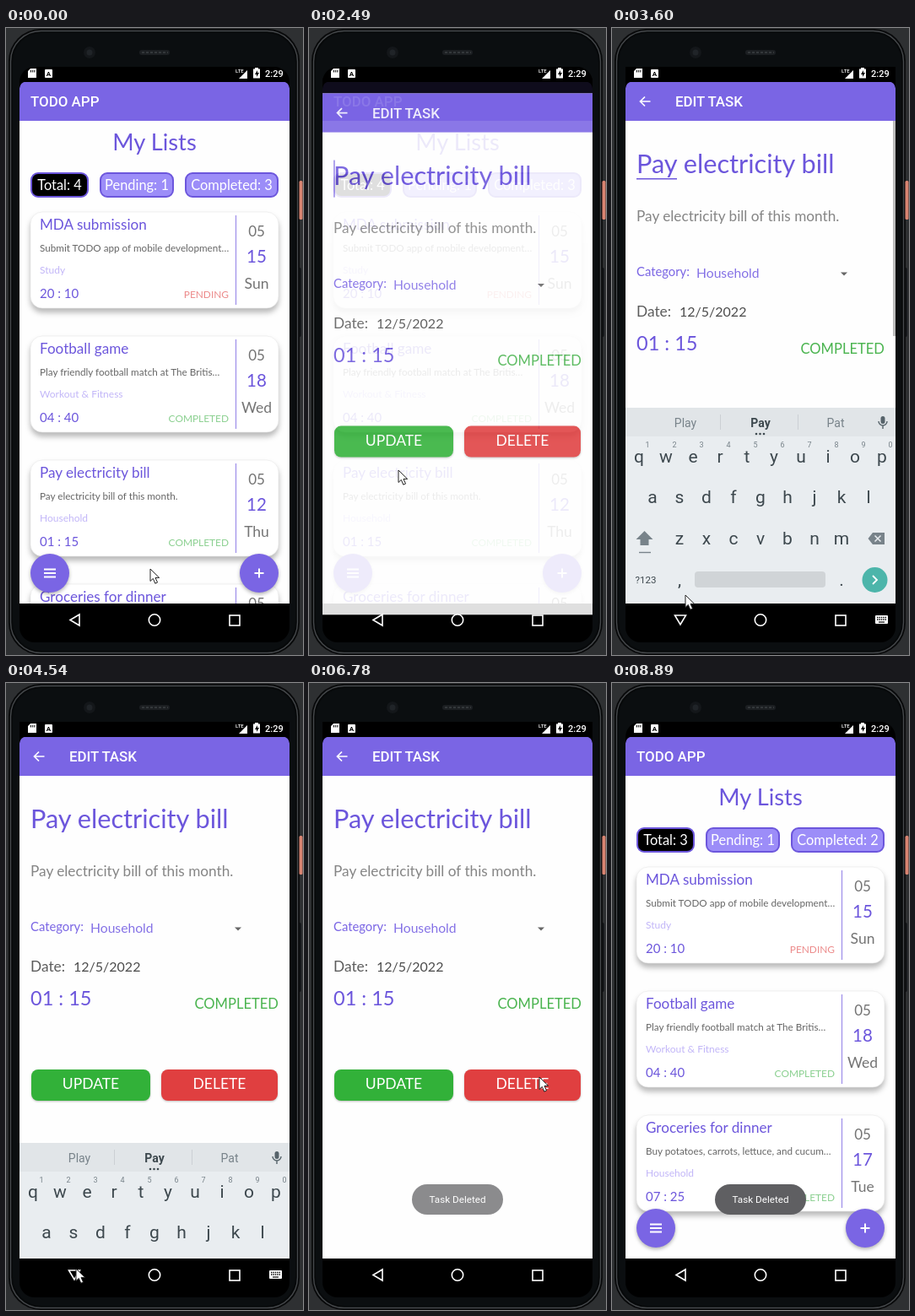
An HTML page that plays this animation: 352x743 px, repeating every 9.56 s.

```html
<!DOCTYPE html>
<html lang="en">
<head>
<meta charset="utf-8">
<title>Todo app demo</title>
<style>
  html, body { margin: 0; width: 100%; height: 100%; overflow: hidden; background: #2e3032; }
  svg { display: block; width: 352px; height: 743px; }
  text { font-family: Lato, "Open Sans", sans-serif; white-space: pre; }
  .ui { font-family: Roboto, sans-serif; }
  .card { filter: drop-shadow(0 5px 3px rgba(0, 0, 0, .27)); }
  .raised { filter: drop-shadow(0 2px 2px rgba(0, 0, 0, .3)); }
  .button { filter: drop-shadow(0 1px 1px rgba(0, 0, 0, .25)); }
</style>
</head>
<body>
<svg id="stage" viewBox="0 0 352 743" xmlns="http://www.w3.org/2000/svg"></svg>
<script>
const LOOP = 9560;
const PURPLE = '#7a65e4', INK = '#6c56dc';

// ---------- markup helpers ----------
const text = (x, y, size, fill, str, extra = '') =>
  `<text x="${x}" y="${y}" font-size="${size}" fill="${fill}" ${extra}>${str}</text>`;
const mid = 'text-anchor="middle"', end = 'text-anchor="end"';
const ui = (x, y, size, fill, str, extra = '') => text(x, y, size, fill, str, `class="ui" ${extra}`);
const rect = (x, y, w, h, fill, extra = '') =>
  `<rect x="${x}" y="${y}" width="${w}" height="${h}" fill="${fill}" ${extra}/>`;
const circle = (x, y, r, fill, extra = '') => `<circle cx="${x}" cy="${y}" r="${r}" fill="${fill}" ${extra}/>`;
const path = (d, fill, extra = '') => `<path d="${d}" fill="${fill}" ${extra}/>`;
const line = (d, stroke, width, extra = '') =>
  path(d, 'none', `stroke="${stroke}" stroke-width="${width}" ${extra}`);
const group = (id, body, extra = '') => `<g id="${id}" ${extra}>${body}</g>`;

// ---------- device ----------
const device = () =>
  rect(0, 0, 352, 743, '#2e3032') +
  rect(346, 284, 4, 82, '#15171a', 'rx="2"') +
  rect(3, 1, 345, 742, '#08090a', 'rx="38"') +
  rect(5.5, 3.5, 340, 737, '#07090a', 'rx="36" stroke="#45484b" stroke-width="1.4"') +
  rect(8, 6, 335, 732, '#0b0e10', 'rx="34"') +
  rect(347.500, 181, 4, 46, '#d98471', 'rx="1.500"') +
  rect(16, 46, 320, 682, '#000', 'rx="18"') +
  circle(99, 29, 7, '#14171a') + circle(99, 29, 3.5, '#202428') +
  rect(158, 26, 36, 6, '#1c1f22', 'rx="3"') +
  line('M161 29H192', '#33373a', 2, 'stroke-dasharray="3 2"');

const statusBar = () =>
  path('M16 63.500h7q-6 1-7 8zM336 63.500h-7q6 1 7 8z', '#000') +
  path('M29 48h7v11h-10v-8z', '#fff') + line('M29.5 50v2.5M31.7 50v2.5M33.9 50v2.5', '#000', 1) +
  rect(46, 49, 9, 10, '#fff', 'rx="1"') +
  ui(50.5, 57, 8, '#000', 'A', `${mid} font-weight="700"`) +
  ui(272, 53, 6, '#fff', 'LTE', 'font-weight="500"') +
  path('M286 50v10h-10z', '#fff') +
  path('M295 48.500v-1.500h4v1.500h2v11h-8v-11z', '#fff') + path('M298 50l-3 5h2v3l3-5h-2z', '#000') +
  ui(307, 58, 11, '#fff', '2:29', 'font-weight="500"');

const outline = 'stroke="#fff" stroke-width="1.6"';
const navBar = () =>
  group('backLeft', path('M87 695v13l-11-6.500z', 'none', outline)) +
  group('backDown', path('M74.500 696h13l-6.500 11z', 'none', outline) +
    rect(312, 696, 15, 10, '#fff', 'rx="1"') +
    line('M314 698.500h11M314 701h11', '#000', 1.3, 'stroke-dasharray="1.4 1"') +
    line('M316 704h7', '#000', 1.2)) +
  circle(176, 701.500, 6.700, 'none', outline) + rect(265, 696, 12, 12, 'none', outline);

// ---------- list screen ----------
const tasks = [
  ['MDA submission', 'Submit TODO app of mobile development…', 'Study', '20 : 10', 'PENDING', 15, 'Sun'],
  ['Football game', 'Play friendly football match at The Britis…', 'Workout &amp; Fitness', '04 : 40', 'COMPLETED', 18, 'Wed'],
  ['Pay electricity bill', 'Pay electricity bill of this month.', 'Household', '01 : 15', 'COMPLETED', 12, 'Thu'],
  ['Groceries for dinner', 'Buy potatoes, carrots, lettuce, and cucum…', 'Household', '07 : 25', 'COMPLETED', 17, 'Tue'],
];

const card = ([title, note, category, time, state, day, weekday], i) =>
  `<g transform="translate(0 ${218 + 147 * i})">` +
  rect(29, 0, 294, 114, '#fff', 'rx="14" class="card" stroke="#e6e6e6" stroke-width=".6"') +
  text(40, 21, 17.1, INK, title) + text(40, 47, 11.700, '#666', note) +
  text(40, 73, 12, '#c2b6f8', category) + text(40, 102, 15, INK, time) +
  text(264, 102, 11.900, state === 'PENDING' ? '#ec8a8a' : '#8bd090', state, end) +
  line('M272.500 4V110', '#9c8ce9', 1.2) +
  text(297, 29, 17, '#747474', '05', mid) + text(297, 60, 20.500, INK, day, mid) +
  text(297, 91, 17.500, '#747474', weekday, mid) + '</g>';

const chip = (x, w, label, dark) =>
  rect(x + 1, 172, w - 2, 28, dark ? '#000' : '#9c8df8', `rx="8" stroke="${INK}" stroke-width="2"`) +
  text(x + w / 2, 191.500, 16.400, '#fff', label, mid);

const fab = (x, icon) => circle(x, 646, 23, PURPLE, 'class="raised"') + line(icon, '#fff', 2);

const header = (x, title) =>
  rect(16, 64, 320, 46, PURPLE) + ui(x, 93, 16.900, '#fff', title, 'font-weight="500"');

const listItems = (items) => {
  const done = items.filter(task => task[4] === 'COMPLETED').length;
  return chip(29, 69, `Total: ${items.length}`, true) +
    chip(111, 88, `Pending: ${items.length - done}`) +
    chip(212, 111, `Completed: ${done}`) + items.map(card).join('');
};

const listScreen = () =>
  rect(16, 64, 320, 618, '#fefefe') +
  text(176, 145, 27.300, INK, 'My Lists', mid) +
  group('fullList', listItems(tasks)) +
  group('shortList', listItems(tasks.filter((_, i) => i !== 2))) +
  header(29, 'TODO APP') +
  fab(52, 'M45 641.500h14M45 646h14M45 650.500h14') + fab(300, 'M294.500 646h11M300 640.500v11');

// ---------- edit screen ----------
const button = (x, w, fill, label) =>
  rect(x, 458, w, 37, fill, 'rx="8" class="button"') + text(x + w / 2, 481, 17.500, '#fff', label, mid);

const editScreen = () =>
  rect(16, 46, 320, 18, '#000') + rect(16, 64, 320, 618, '#fefefe') +
  header(75, 'EDIT TASK') +
  line('M45.500 87H34M39 81.500L33.500 87L39 92.500', '#fff', 1.7) +
  text(29, 172, 30.700, INK, 'Pay electricity bill') +
  group('caret', rect(29, 143, 1.8, 44, '#9c8ce9')) +
  group('underline', rect(29, 178, 48, 1.5, INK)) +
  text(29, 229, 17.200, '#858585', 'Pay electricity bill of this month.') +
  text(29, 294, 14.800, PURPLE, 'Category:') + text(100, 296, 15.700, '#8572e6', 'Household') +
  path('M271 289.500h8l-4 4z', '#666') +
  text(29, 342, 17.300, '#5c5c5c', 'Date:') + text(80, 342, 16, '#4c4c4c', '12/5/2022') +
  text(29, 382, 23.500, INK, '01 : 15') + text(323, 386, 16.600, '#4ab44f', 'COMPLETED', end) +
  button(30, 141, '#32b139', 'UPDATE') + button(184, 138, '#e03f40', 'DELETE') +
  `<g clip-path="url(#deleteClip)">${circle(273, 467, 0, '#fff', 'id="ripple"')}</g>` +
  group('scrollbar', rect(333, 110, 3, 255, '#bcbcbc'));

// ---------- keyboard ----------
const KEY = '#3d484e';
const keyRow = (letters, x, y) =>
  [...letters].map((c, i) => ui(x + 32 * i, y, 21, KEY, c, mid)).join('');

const keyboard = () =>
  rect(16, 450, 320, 232, '#e9edf0') + rect(16, 450, 320, 34, '#e1e5e8') +
  group('suggestions',
    ui(87, 473, 14, '#78838a', 'Play', mid) + ui(176, 473, 14, KEY, 'Pay', `${mid} font-weight="700"`) +
    ui(265, 473, 14, '#78838a', 'Pat', mid) + line('M128.500 458v18M220.500 458v18', '#cbd0d4', 1) +
    [171, 175.500, 180].map(x => circle(x, 481, 1.3, KEY)).join('')) +
  rect(318.500, 460, 5, 9, '#56636a', 'rx="2.500"') + line('M316 466a5 5 0 0 0 10 0M321 471v4', '#56636a', 1.4) +
  keyRow('qwertyuiop', 32, 515) +
  [...'1234567890'].map((c, i) => ui(42 + 32 * i, 497, 9, '#78838a', c, mid)).join('') +
  keyRow('asdfghjkl', 48, 563) + keyRow('zxcvbnm', 80, 612) +
  path('M38.500 596l10 10h-5v7h-10v-7h-5z', '#78838a') + line('M32 621.500h14', '#78838a', 1.4) +
  path('M309 598h14v14h-14l-5.500-7z', '#78838a') + line('M311.500 601.500l7 7M318.500 601.500l-7 7', '#e9edf0', 1.5) +
  ui(40, 658, 11.500, KEY, '?123', mid) + ui(80, 661, 21, KEY, ',', mid) + ui(272, 661, 21, KEY, '.', mid) +
  rect(98, 644, 155, 19, '#d0d4d7', 'rx="4"') +
  circle(311.500, 654, 15, '#4cb5aa') + line('M309 649l5 5l-5 5', '#fff', 1.8);

const toast = () =>
  rect(122, 594, 108, 36, '#5f5f62', 'rx="18"') + ui(176, 616, 11.700, '#fff', 'Task Deleted', mid);

const pointer = () =>
  path('M0 0v14.500l3.300-3.100l2.500 5.800l2.700-1.200l-2.500-5.600h4.700z', '#fff', 'stroke="#222" stroke-width="1"');

const stage = document.getElementById('stage');
stage.innerHTML =
  `<defs><clipPath id="screenClip">${rect(16, 46, 320, 636, '#000')}</clipPath>
   <clipPath id="deleteClip">${rect(184, 458, 138, 37, '#000', 'rx="8"')}</clipPath></defs>` +
  device() +
  group('list', listScreen(), 'clip-path="url(#screenClip)"') +
  group('edit', editScreen(), 'clip-path="url(#screenClip)"') +
  `<g clip-path="url(#screenClip)">${group('keyboard', keyboard())}</g>` +
  statusBar() + navBar() + group('toast', toast()) + group('pointer', pointer());

// ---------- timeline ----------
const series = (from, to, step) => Array.from({ length: Math.round((to - from) / step) + 1 }, (_, i) => from + i * step);
const ticks = [0, 580, 700, 820, 970, 1090, 2490, 2640, 2780, 2900, 3030, 3180, 3300, 3450, 3600, 3750, 3870,
  4150, 4270, ...series(4420, 4780, 120), 4930, 5080, 5200, 5320, ...series(5910, 6630, 120),
  6780, 6900, 7020, 7170, 8500, 8650, 8770, 8890];

const hold = t => ticks.findLast(tick => tick <= t);

const track = (t, keys, i = 1) => {
  if (t <= keys[0][0]) return keys[0][i];
  const next = keys.findIndex(key => key[0] > t);
  if (next < 0) return keys.at(-1)[i];
  const a = keys[next - 1], b = keys[next];
  return a[i] + (b[i] - a[i]) * (t - a[0]) / (b[0] - a[0]);
};

const pointerKeys = [[460, 171, 641], [820, 132, 560], [970, 112, 531], [1090, 106, 524],
  [3300, 106, 524], [3450, 98, 635], [3600, 87, 672], [3870, 83, 694], [4780, 83, 694],
  [4930, 120, 593], [5080, 200, 525], [5200, 262, 476], [5320, 273, 467],
  [7170, 273, 467], [8500, 67, 645], [8650, 80, 690], [8770, 88, 708]];
const shiftKeys = [[2490, 13.6], [2640, 0], [6780, 0], [6900, 4], [7020, 15]];
const alphaKeys = [[2490, .88], [2640, 1], [6780, 1], [6900, .9], [7020, .45]];
const keyboardKeys = [[2640, 232], [2780, 130], [2900, 35], [3030, 0],
  [4270, 0], [4420, 25], [4540, 95], [4660, 180], [4780, 232]];
const toastKeys = [[6630, 0], [6780, .72], [6900, 1]];
const caretOn = [[2490, 3240], [3750, 4200], [4850, 5910], [6390, 6780]];

const $ = id => document.getElementById(id);
const show = (id, on) => $(id).setAttribute('visibility', on ? 'inherit' : 'hidden');
const move = (id, x, y) => $(id).setAttribute('transform', `translate(${x} ${y})`);
const fade = (id, alpha) => $(id).setAttribute('opacity', alpha);
const within = (t, from, to) => t >= from && t < to;

function render(time) {
  const t = hold(time);
  const deleted = t >= 6900;
  show('fullList', !deleted);
  show('shortList', deleted);

  show('edit', within(t, 2490, 7170));
  move('edit', 0, track(t, shiftKeys));
  fade('edit', track(t, alphaKeys));
  show('caret', caretOn.some(([from, to]) => within(t, from, to)));

  const typing = within(t, 2780, 4780);
  show('keyboard', typing);
  move('keyboard', 0, track(t, keyboardKeys));
  show('suggestions', t >= 3180);
  show('underline', within(t, 3180, 4420));
  show('scrollbar', within(t, 3030, 3750));
  show('backDown', typing);
  show('backLeft', !typing);

  $('ripple').setAttribute('r', track(t, [[5910, 0], [6270, 110]]));
  fade('ripple', track(t, [[5910, .16], [6270, .16], [6630, 0]]));

  fade('toast', track(t, toastKeys));
  move('pointer', track(t, pointerKeys, 1), track(t, pointerKeys, 2));
  // It rests until the next move, then leaves through the bottom edge.
  if (within(t, 7170, 8500)) move('pointer', 273, 467);
  show('pointer', t < 8890);
}

const start = performance.now();
function tick() {
  render((performance.now() - start) % LOOP);
  requestAnimationFrame(tick);
}
tick();
</script>
</body>
</html>
```
